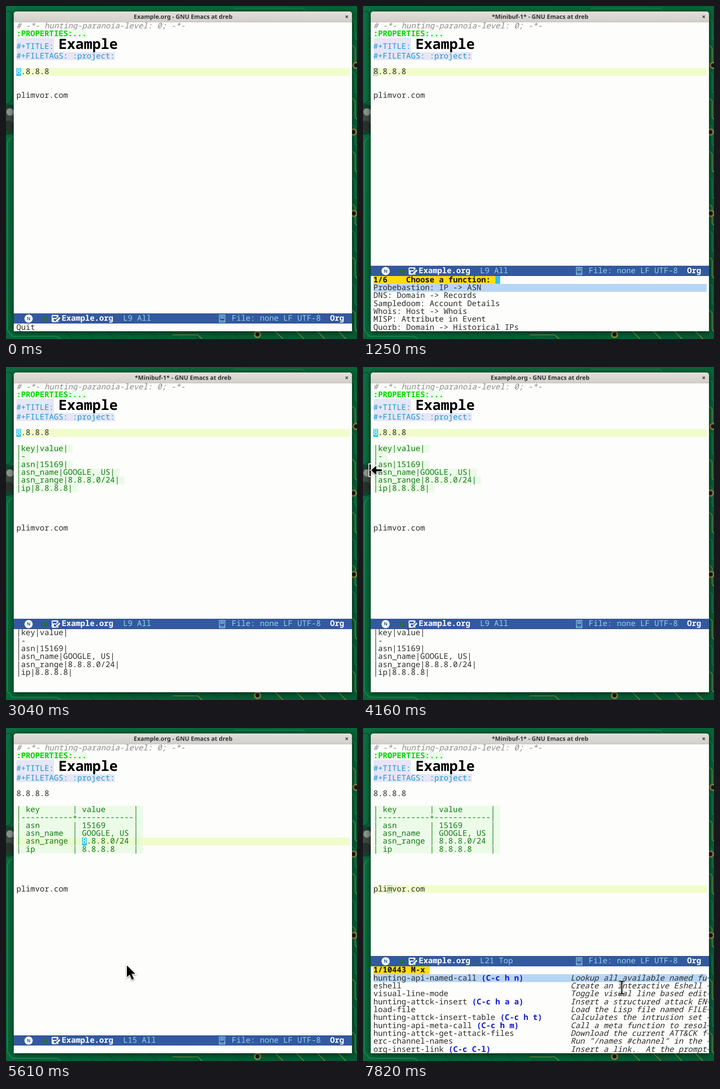
An HTML page with a canvas for the animation above (8000 ms loop, 769 by 729 pixels).

```html
<!DOCTYPE html>
<html lang="en">
<head>
<meta charset="utf-8">
<title>Editor session</title>
<style>
  html, body { margin: 0; width: 100%; height: 100%; overflow: hidden; background: #075c33; }
  canvas { display: block; }
</style>
</head>
<body>
<canvas width="769" height="729"></canvas>
<script>
const ctx = document.querySelector('canvas').getContext('2d');
const LOOP = 8000;
const CELL = 10.286, ROW = 17.36, LEFT = 22.7, RIGHT = 753;
const FONT_SIZE = CELL / 0.6;
const MONO = '"Noto Sans Mono", "Liberation Mono", monospace';
const INK = '#2c2c2c', PAPER = '#fdfdfb', HIGHLIGHT = '#f1fccb', CURSOR = '#2cc3ee';
const TABLE_INK = '#127a12', TABLE_BG = '#ebfbe8';
const DOMAIN = 'plimvor.com';

const RAW_TABLE = ['|key|value|', '|-', '|asn|15169|', '|asn_name|GOOGLE, US|',
  '|asn_range|8.8.8.0/24|', '|ip|8.8.8.8|'];
const cells = (key, value) => `| ${key.padEnd(9)} | ${value.padEnd(10)} |`;
const ALIGNED_TABLE = [cells('key', 'value'), `|${'-'.repeat(11)}+${'-'.repeat(12)}|`,
  cells('asn', '15169'), cells('asn_name', 'GOOGLE, US'),
  cells('asn_range', '8.8.8.0/24'), cells('ip', '8.8.8.8')];

const FUNCTIONS = ['Probebastion: IP -> ASN', 'DNS: Domain -> Records',
  'Sampledoom: Account Details', 'Whois: Host -> Whois',
  'MISP: Attribute in Event', 'Quorb: Domain -> Historical IPs'];

const COMMANDS = [
  ['hunting-api-named-call', '(C-c h n)', 'Lookup all available named fu'],
  ['eshell', '', 'Create an interactive Eshell'],
  ['visual-line-mode', '', 'Toggle visual line based edit'],
  ['hunting-attck-insert', '(C-c h a a)', 'Insert a structured attack EN'],
  ['load-file', '', 'Load the Lisp file named FILE'],
  ['hunting-attck-insert-table', '(C-c h t)', 'Calculates the intrusion set'],
  ['hunting-api-meta-call', '(C-c h m)', 'Call a meta function to resol'],
  ['hunting-attck-get-attack-files', '', 'Download the current ATT&CK f'],
  ['erc-channel-names', '', 'Run "/names #channel" in the'],
  ['org-insert-link', '(C-c C-l)', 'Insert a link.  At the prompt'],
];

// Pointer stops: time, x, y, shape used from that time on
const POINTER = [
  [3660, 775, 640, 'arrow'], [3900, 400, 390, 'arrow'], [4130, 27, 226, 'edge'],
  [4270, 27, 226, 'edge'], [4300, 32, 227, 'beam'], [4820, 90, 247, 'beam'],
  [5030, 90, 247, 'beam'], [5100, 130, 310, 'arrow'], [5310, 264, 518, 'arrow'],
  [5640, 264, 518, 'arrow'], [5930, 165, 328, 'arrow'], [6130, 66, 346, 'beam'],
  [6200, 60.5, 347, 'beam'], [6600, 60.5, 347, 'beam'], [6650, 150, 385, 'arrow'],
  [6830, 567, 568, 'arrow'], [7060, 567, 568, 'beam'], [LOOP, 567, 568, 'beam'],
];

const between = (t, from, to) => t >= from && t < to;
const lineTop = k => 135.7 + k * ROW;

function rect(x, y, w, h, color) {
  ctx.fillStyle = color;
  ctx.fillRect(x, y, w, h);
}

function text(str, col, top, color = INK, style = '', bg) {
  const x = LEFT + col * CELL;
  if (bg) rect(x, top, str.length * CELL, ROW, bg);
  ctx.font = `${style} ${FONT_SIZE}px ${MONO}`;
  ctx.fillStyle = color;
  ctx.fillText(str, x, top + 13.6);
}

function stroke(points, color, width) {
  ctx.beginPath();
  points.forEach(([x, y]) => ctx.lineTo(x, y));
  ctx.strokeStyle = color;
  ctx.lineWidth = width;
  ctx.stroke();
}

function disc(x, y, r, color) {
  ctx.fillStyle = color;
  ctx.beginPath();
  ctx.arc(x, y, r, 0, 7);
  ctx.fill();
}

function drawBoard() {
  const green = ctx.createLinearGradient(0, 0, 769, 729);
  green.addColorStop(0, '#0a6e40');
  green.addColorStop(.5, '#056638');
  green.addColorStop(1, '#075a33');
  rect(0, 0, 769, 729, green);

  const gold = '#84924a', pale = '#248350', dark = '#045030';
  stroke([[0, 12], [10, 12], [14, 18], [14, 204], [8, 212], [0, 214]], dark, 2);
  stroke([[17, 286], [8, 290], [3, 300], [3, 710], [14, 723], [112, 723], [120, 729]], pale, 2);
  disc(2, 248, 34, '#15422f');
  disc(4, 246, 22, '#3c4c42');
  disc(9, 232, 8, '#8b958b');
  disc(6, 262, 11, '#26332c');

  for (let x = 130; x < 769; x += 46) {
    stroke([[x, 712], [x + 17, 729]], x > 560 ? gold : dark, 1.5);
  }
  stroke([[365, 720], [420, 720], [430, 729]], gold, 1.5);
  stroke([[500, 5], [650, 5], [657, 12]], pale, 1.5);
  for (let y = 40; y < 700; y += 58) {
    stroke([[759, y - 12], [765, y - 6], [765, y + 30], [769, y + 34]], y % 4 ? gold : pale, 1.5);
  }
  for (const [x, y] of [[767, 130], [761, 276], [762, 454], [551, 719]]) {
    disc(x, y, 8, '#8b8240');
    disc(x, y, 4.5, '#111c14');
  }
}

function drawFrame(title) {
  ctx.save();
  ctx.shadowColor = '#000a';
  ctx.shadowBlur = 13;
  ctx.shadowOffsetY = 2;
  ctx.fillStyle = PAPER;
  ctx.beginPath();
  ctx.roundRect(17, 12, 741, 700, [6, 6, 0, 0]);
  ctx.fill();
  ctx.restore();

  const bar = ctx.createLinearGradient(0, 12, 0, 35);
  bar.addColorStop(0, '#e2dfdb');
  bar.addColorStop(1, '#d3cfca');
  ctx.fillStyle = bar;
  ctx.beginPath();
  ctx.roundRect(17, 12, 741, 23, [6, 6, 0, 0]);
  ctx.fill();
  rect(17, 34.5, 741, 1, '#b9b4ae');

  ctx.font = 'bold 13px "Noto Sans", "Open Sans", sans-serif';
  ctx.textAlign = 'center';
  ctx.fillStyle = '#303536';
  ctx.fillText(`${title} - GNU Emacs at dreb`, 388, 28);
  ctx.textAlign = 'left';
  stroke([[744, 21], [749, 26]], '#333', 1.6);
  stroke([[749, 21], [744, 26]], '#333', 1.6);
}

function drawCursor(col, top, char, filled) {
  const x = LEFT + col * CELL;
  if (filled) {
    rect(x, top, CELL, ROW, CURSOR);
    text(char, col, top, '#fff');
  } else {
    ctx.strokeStyle = '#67bd9b';
    ctx.lineWidth = 1;
    ctx.strokeRect(x + .5, top + .5, CELL - 1, ROW - 1);
  }
}

function drawBuffer(t, inMinibuffer) {
  text('# -*- hunting-paranoia-level: 0; -*-', 0, 35, '#8b8b88', 'italic');
  text(':PROPERTIES:...', 0, 52.3, '#00d900', 'bold', '#eefbee');
  rect(LEFT, 70, 8 * CELL, 31, '#e6e6f6');
  text('#+TITLE:', 0, 80.3, '#1c98d3');
  ctx.font = `800 30.9px ${MONO}`;
  ctx.fillStyle = '#000';
  ctx.fillText('Example', 115, 94);
  text('#+FILETAGS: :project:', 0, 101, '#1c98d3', '', '#e6e6f6');

  const hasTable = t >= 3040, aligned = t >= 5220;
  const line = t < 4980 ? 0 : t < 6400 ? 6 : 12;
  rect(LEFT, lineTop(line), RIGHT - LEFT, ROW, HIGHLIGHT);
  text('8.8.8.8', 0, lineTop(0));
  if (hasTable) {
    (aligned ? ALIGNED_TABLE : RAW_TABLE).forEach((row, i) => {
      const bg = i + 2 === line ? '#e9fbcf' : TABLE_BG;
      text(row + ' ', 0, lineTop(i + 2), TABLE_INK, '', bg);
    });
  }
  text(DOMAIN, 0, lineTop(hasTable ? 12 : 3));

  const [col, char] = line === 0 ? [0, '8'] : line === 12 ? [3, DOMAIN[3]]
    : aligned ? [14, '8'] : [6, RAW_TABLE[4][6]];
  drawCursor(col, lineTop(line), char, !inMinibuffer);
}

function drawModeline(top, position) {
  rect(17, top, 741, 22, '#3359a1');
  rect(17, top, 741, 1, '#25437c');
  rect(17, top + 21, 741, 1, '#25437c');
  const mid = top + 11.3, textTop = top + 2.4;
  disc(49.5, mid, 9, '#fff');
  ctx.font = 'bold 10px "Noto Sans", sans-serif';
  ctx.fillStyle = '#3359a1';
  ctx.fillText('N', 45.5, mid + 3.7);
  disc(86, mid + .5, 5.5, '#2d6b45');

  // Floppy disk with a pencil
  ctx.fillStyle = '#fff';
  ctx.beginPath();
  ctx.roundRect(100, mid - 8, 15, 16, 2);
  ctx.fill();
  rect(102, mid - 5.5, 9, 4, '#3359a1');
  disc(107, mid + 3, 2.5, '#3359a1');
  stroke([[109, mid + 6], [118, mid - 3]], '#3359a1', 6);
  stroke([[110, mid + 6], [118, mid - 2]], '#fff', 3.5);

  const mono = (str, x, color, style) => text(str, (x - LEFT) / CELL, textTop, color, style);
  mono('Example.org', 122, '#fff', 'bold');
  mono(position, 256.5, '#8fd3e8');
  mono('File: none LF UTF-8', 494.5, '#8fd3e8');
  mono('Org', 710, '#fff', 'bold');

  ctx.strokeStyle = '#8fd3e8';
  ctx.lineWidth = 1.5;
  ctx.strokeRect(467.5, mid - 8, 12, 16);
  ctx.strokeRect(471, mid - 5, 5, 4);
  stroke([[467, mid + 5], [480, mid + 5]], '#8fd3e8', 1.2);
}

function drawPrompt(prompt, top, cursorOn) {
  text(prompt, 0, top, '#111', 'bold', '#ffdc0a');
  if (cursorOn) rect(LEFT + prompt.length * CELL, top, CELL, ROW, CURSOR);
  rect(LEFT, top + ROW, RIGHT - LEFT, ROW, '#b7d5f5');
}

function drawCommands(top, cursorOn) {
  drawPrompt('1/10443 M-x ', top, cursorOn);
  COMMANDS.forEach(([name, key, doc], i) => {
    const y = top + (i + 1) * ROW;
    text(name, 0, y);
    text(key, name.length + 1, y, '#0f14cf', 'bold');
    text(doc, 42, y, INK, 'italic');
    stroke([[754, y + 8.5], [757.5, y + 8.5]], '#5a9bd0', 1.2);
    stroke([[755.5, y + 6.5], [757.5, y + 8.5], [755.5, y + 10.5]], '#5a9bd0', 1);
  });
}

function drawFunctions(top, cursorOn) {
  drawPrompt('1/6    Choose a function: ', top, cursorOn);
  FUNCTIONS.forEach((name, i) => text(name, 0, top + (i + 1) * ROW));
}

function outlined(points) {
  ctx.beginPath();
  points.forEach(([x, y]) => ctx.lineTo(x, y));
  ctx.closePath();
  ctx.strokeStyle = '#fff';
  ctx.lineWidth = 4;
  ctx.stroke();
  ctx.fillStyle = '#000';
  ctx.fill();
}

const SHAPES = {
  arrow() {
    outlined([[1, 2], [1, 27], [7, 21.5], [12, 33], [16, 31], [11, 20], [19, 20]]);
  },
  beam() {
    for (const [color, width] of [['#fff', 5], ['#111', 2.2]]) {
      stroke([[0, -13], [0, 13]], color, width);
      for (const s of [-1, 1]) {
        stroke([[-6, s * 14], [-2, s * 14], [0, s * 12], [2, s * 14], [6, s * 14]], color, width);
      }
    }
  },
  edge() {
    outlined([[-13, -13], [-10, -13], [-10, 13], [-13, 13]]);
    outlined([[-9, 0], [2, -10], [2, -2], [14, -2], [14, 2], [2, 2], [2, 10]]);
  },
};

function drawPointer(t) {
  const i = POINTER.findIndex((stop, n) => n && between(t, POINTER[n - 1][0], stop[0]));
  if (i < 0) return;
  const [t0, x0, y0, shape] = POINTER[i - 1], [t1, x1, y1] = POINTER[i];
  const p = (t - t0) / (t1 - t0);
  ctx.save();
  ctx.translate(x0 + (x1 - x0) * p, y0 + (y1 - y0) * p);
  ctx.shadowColor = '#0006';
  ctx.shadowBlur = 3;
  ctx.shadowOffsetY = 1;
  SHAPES[shape]();
  ctx.restore();
}

function draw(t) {
  const commands = between(t, 530, 1040) || t >= 7030;
  const functions = between(t, 1040, 3040);
  const result = between(t, 3040, 4980);
  const rows = commands ? 11 : functions ? 7 : result ? 8 : 1;
  const modelineTop = 673 - (rows - 1) * ROW, echoTop = modelineTop + 22.2;
  const minibufferTitle = between(t, 830, 3100) || t >= 7390;

  drawBoard();
  drawFrame(minibufferTitle ? '*Minibuf-1*' : 'Example.org');
  drawBuffer(t, commands || functions);

  const lineNumber = t < 4980 ? 9 : t < 6400 ? 15 : 21;
  if (commands) drawCommands(echoTop, between(t, 830, 1040) || between(t, 7390, 7820));
  else if (functions) drawFunctions(echoTop, !between(t, 1720, 2180) && t < 2810);
  else if (result) RAW_TABLE.forEach((row, i) => text(row, 0, echoTop + i * ROW));
  else if (t < 530) text('Quit', 0, echoTop);
  drawModeline(modelineTop, `L${lineNumber} ${t >= 7030 ? 'Top' : 'All'}`);

  drawPointer(t);
}

ctx.textRendering = 'geometricPrecision';
function tick() {
  draw(performance.now() % LOOP);
  requestAnimationFrame(tick);
}
tick();
</script>
</body>
</html>
```
